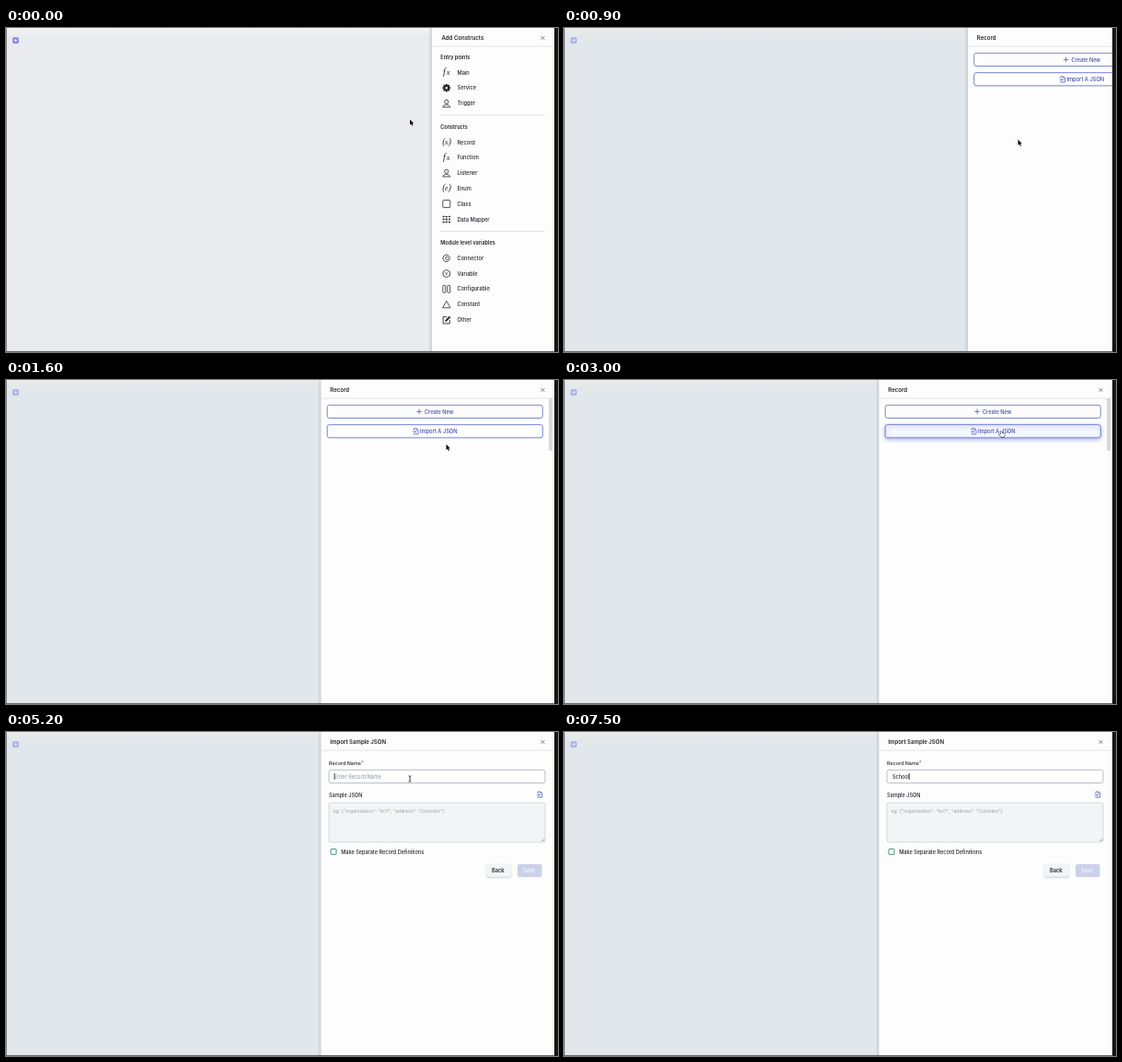
These frames come from a looping animation (600 px wide and 353 px high, 8 s). An HTML page with a canvas:

```html
<!DOCTYPE html>
<html lang="en">
<head>
<meta charset="utf-8">
<title>Add Constructs</title>
<style>
html, body { margin: 0; width: 100%; height: 100%; overflow: hidden; background: #e3e7eb; }
canvas { display: block; }
</style>
</head>
<body>
<canvas id="stage" width="600" height="353"></canvas>
<script>
const ctx = document.getElementById('stage').getContext('2d');
const W = 600, H = 353, LOOP = 8000, STEP = 100;
const EDGE = 596, WIDE = 342.5, NARROW = 463;
const SANS = 'Inter, "Open Sans", sans-serif';
const SERIF = '"Liberation Serif", "Noto Serif", serif';
const INK = '#24252c', BLUE = '#4a5ac4', PAPER = '#fdfdfd';

// Cursor waypoints: time, x, y
const PATH = [
  [0, 439, 99.5], [500, 493.5, 121.5], [950, 493.5, 121.5], [1500, 478.5, 70],
  [1600, 478.5, 70], [1800, 480, 93], [2200, 475.5, 55.5], [3600, 475.5, 55.5],
  [4200, 439, 51]
];
// Moment each letter of the word appears
const KEYS = [5500, 6400, 6700, 7000, 7200, 7500];
const WORD = 'School';

function text(str, x, y, size, color = INK, weight = 500) {
  ctx.font = `${weight} ${size}px ${SANS}`;
  ctx.fillStyle = color;
  ctx.fillText(str, x, y + 2.05);
}

function serif(str, x, y, size) {
  ctx.font = `italic 500 ${size}px ${SERIF}`;
  ctx.fillStyle = INK;
  ctx.fillText(str, x, y);
}

function line(points, color = INK, width = 0.8, close = false) {
  ctx.beginPath();
  points.forEach(([x, y], i) => i ? ctx.lineTo(x, y) : ctx.moveTo(x, y));
  if (close) ctx.closePath();
  ctx.strokeStyle = color;
  ctx.lineWidth = width;
  ctx.stroke();
}

function arc(x, y, r, from = 0, to = Math.PI * 2, color = INK, width = 0.8) {
  ctx.beginPath();
  ctx.arc(x, y, r, from, to);
  ctx.strokeStyle = color;
  ctx.lineWidth = width;
  ctx.stroke();
}

function box(x, y, w, h, r, fill, stroke, width = 1) {
  ctx.beginPath();
  ctx.roundRect(x, y, w, h, r);
  if (fill) { ctx.fillStyle = fill; ctx.fill(); }
  if (stroke) { ctx.strokeStyle = stroke; ctx.lineWidth = width; ctx.stroke(); }
}

function shadowed(color, blur, dy, draw) {
  ctx.save();
  ctx.shadowColor = color;
  ctx.shadowBlur = blur;
  ctx.shadowOffsetY = dy;
  draw();
  ctx.restore();
}

function at(x, y, draw) {
  ctx.save();
  ctx.translate(x, y);
  draw();
  ctx.restore();
}

const icons = {
  fx() { serif('f', -3.8, 2.6, 10); serif('x', 0, 2.6, 8.5); },
  gear() {
    ctx.fillStyle = INK;
    for (let i = 0; i < 8; i++) {
      ctx.save();
      ctx.rotate(i * Math.PI / 4);
      ctx.fillRect(-0.95, -4.3, 1.9, 2.5);
      ctx.restore();
    }
    arc(0, 0, 2.3, 0, Math.PI * 2, INK, 1.9);
  },
  person() {
    arc(0, -1.8, 2.1);
    ctx.beginPath();
    ctx.moveTo(-4, 4);
    ctx.bezierCurveTo(-3.8, 0.6, 3.8, 0.6, 4, 4);
    ctx.closePath();
    ctx.stroke();
  },
  record() { brackets('x'); },
  enumeration() { brackets('e'); },
  square() { box(-4, -4, 8, 8, 0.8, null, INK, 0.8); },
  mapper() {
    for (const y of [-3, 0, 3]) {
      box(-4.2, y - 0.8, 2, 1.6, 0, INK);
      line([[-1.5, y], [1.6, y]], INK, 0.8);
      box(2.4, y - 0.8, 1.8, 1.6, 0, INK);
    }
    line([[0, -3], [0, 3]], INK, 0.7);
  },
  connector() {
    arc(0, 0, 3.8, 0.75, Math.PI * 2 - 0.75);
    arc(0.7, 0, 1.7, 0.6, Math.PI * 2 - 0.6);
    line([[2.1, -1], [4.4, -1]]);
    line([[2.1, 1], [4.4, 1]]);
  },
  hexagon() {
    line([[0, -4.2], [3.7, -2.1], [3.7, 2.1], [0, 4.2], [-3.7, 2.1], [-3.7, -2.1]], INK, 0.8, true);
    line([[-1.6, -1.3], [0, 0], [1.6, -1.3]], INK, 0.7);
    line([[0, 0], [0, 2]], INK, 0.7);
  },
  columns() {
    box(-3.9, -4, 2.9, 8, 0.9, null, INK, 0.8);
    box(1, -4, 2.9, 8, 0.9, null, INK, 0.8);
  },
  triangle() { line([[0, -3.8], [4.2, 3.6], [-4.2, 3.6]], INK, 0.8, true); },
  edit() {
    line([[0.5, -3.3], [-3.7, -3.3], [-3.7, 4], [3.5, 4], [3.5, 0.2]], INK, 0.9);
    line([[-1.2, 1.6], [3.8, -3.5]], INK, 1.9);
  }
};

function brackets(letter) {
  serif('(', -4.6, 2.5, 9.5);
  serif(letter, -1.8, 2.1, 8);
  serif(')', 1.9, 2.5, 9.5);
}

const SECTIONS = [
  ['Entry points', 31.5, [['fx', 'Main', 48.5], ['gear', 'Service', 65.3], ['person', 'Trigger', 82.2]]],
  ['Constructs', 107.5, [['record', 'Record', 124.5], ['fx', 'Function', 141.3],
    ['person', 'Listener', 158], ['enumeration', 'Enum', 174.8], ['square', 'Class', 191.6],
    ['mapper', 'Data Mapper', 208.5]]],
  ['Module level variables', 234, [['connector', 'Connector', 250.8], ['hexagon', 'Variable', 267.6],
    ['columns', 'Configurable', 284.4], ['triangle', 'Constant', 301.2], ['edit', 'Other', 318]]]
];

function importIcon(x, y) {
  at(x, y, () => {
    line([[-2, -0.8], [-2, -3], [0.9, -3], [2.7, -1.2], [2.7, 3.2], [-2, 3.2], [-2, 2]], BLUE, 0.75);
    line([[0.9, -3], [0.9, -1.2], [2.7, -1.2]], BLUE, 0.6);
    line([[-3.2, 0.6], [0.5, 0.6]], BLUE, 0.7);
    line([[-0.6, -0.5], [0.5, 0.6], [-0.6, 1.7]], BLUE, 0.7);
  });
}

function backdrop(dimmed) {
  const base = dimmed ? '#e2e7eb' : '#eaebef';
  ctx.fillStyle = base;
  ctx.fillRect(0, 0, W, H);
  const fade = ctx.createLinearGradient(0, 0, 0, 9);
  fade.addColorStop(0, dimmed ? '#ebebed' : '#f3f3f5');
  fade.addColorStop(1, base);
  ctx.fillStyle = fade;
  ctx.fillRect(0, 0, W, 9);
  box(7.5, 10.5, 6, 6, 1.2, dimmed ? '#b3b9ea' : '#8f95e3', dimmed ? '#a4abe2' : '#777ed8', 0.8);
  const mark = dimmed ? '#e3e6fa' : '#eceefe';
  line([[9, 13.5], [12, 13.5]], mark, 0.8);
  line([[10.5, 12], [10.5, 15]], mark, 0.8);
}

function frame() {
  ctx.fillStyle = '#6b6c70';
  ctx.fillRect(0, 0, 0.8, H);
  ctx.fillRect(0, H - 1, EDGE, 1);
  ctx.fillStyle = '#161712';
  ctx.fillRect(EDGE, 0, W - EDGE, H);
}

function panel(left, title, titleX) {
  const shade = ctx.createLinearGradient(left - 4, 0, left, 0);
  shade.addColorStop(0, 'rgba(60,65,80,0)');
  shade.addColorStop(1, 'rgba(60,65,80,0.16)');
  ctx.fillStyle = shade;
  ctx.fillRect(left - 4, 0, 4, H);
  ctx.fillStyle = PAPER;
  ctx.fillRect(left, 0, W - left, H);
  ctx.fillStyle = '#e3e4e8';
  ctx.fillRect(left, 19.5, W - left, 1);
  text(title, titleX, 10.7, 6.05, INK, 600);
}

function closeMark(x) {
  line([[x - 1.9, 9], [x + 1.9, 12.8]], '#555661', 0.75);
  line([[x + 1.9, 9], [x - 1.9, 12.8]], '#555661', 0.75);
}

function constructList(hover) {
  panel(NARROW, 'Add Constructs', 473.5);
  closeMark(583.5);
  SECTIONS.forEach(([title, y, rows], i) => {
    if (i) {
      ctx.fillStyle = '#e1e2e6';
      ctx.fillRect(472, y - 13, 114, 1);
    }
    text(title, 472.3, y, 5.5, INK, 600);
    for (const [icon, label, rowY] of rows) {
      at(478.8, rowY, icons[icon]);
      text(label, 490.5, rowY, 5.7, hover && label === 'Record' ? BLUE : INK);
    }
  });
}

function recordMenu(shift, hover) {
  at(shift, 0, () => {
    panel(WIDE, 'Record', 352.3);
    closeMark(583.5);
    box(349.2, 27.3, 234.1, 14.2, 2.4, PAPER, '#7580c2', 0.95);
    line([[446.3, 34.4], [451.9, 34.4]], BLUE, 0.8);
    line([[449.1, 31.6], [449.1, 37.2]], BLUE, 0.8);
    text('Create New', 455, 34.5, 5.62, '#3f4da8');
    const button = () => box(349.2, 48.7, 234.1, 14.2, 2.4, hover ? '#f5f7ff' : PAPER, '#6b79d4', 0.95);
    if (hover) shadowed('rgba(85,103,213,0.45)', 4, 1.5, button);
    else button();
    importIcon(445.3, 55.8);
    text('Import A JSON', 449.9, 55.9, 5.73, '#3f4da8');
    ctx.fillStyle = '#d9d9db';
    ctx.fillRect(590, 20, 4, 57);
  });
}

function caretOn(t, typed) {
  if (t < 4200) return false;
  const last = typed ? KEYS[typed - 1] : 4200;
  return Math.floor((t - last) / 500) % 2 === 0;
}

function form(t) {
  panel(WIDE, 'Import Sample JSON', 352.3);
  closeMark(583.5);
  text('Record Name', 351, 34, 5.42);
  text('*', 385.8, 34, 5.6, '#d9434e');
  box(351, 41.3, 235, 14.3, 2.4, '#fff', t < 4200 ? '#d3d5dd' : '#b2b6c0', 0.9);

  const typed = KEYS.filter(k => k <= t).length;
  const word = WORD.slice(0, typed);
  if (typed) text(word, 356.9, 48.6, 5.5);
  else text('Enter Record Name', 356.9, 48.6, 5.57, '#8d91a3', 400);
  if (caretOn(t, typed)) {
    ctx.font = `500 5.5px ${SANS}`;
    ctx.fillStyle = INK;
    ctx.fillRect(356.6 + (typed ? ctx.measureText(word).width + 0.1 : 0), 45, 0.8, 7);
  }

  text('Sample JSON', 351, 69.3, 5.55);
  importIcon(580, 68);
  box(351, 77, 235, 43, 2, '#f3f4f6', '#d4d6dc', 0.9);
  text('eg: {"organization": "kri7", "address": "Colombo"}', 355.6, 86.3, 5.15, '#9a9da9', 400);
  line([[582.3, 119], [585.3, 116]], '#777a82', 0.6);
  line([[584, 119], [585.3, 117.7]], '#777a82', 0.6);

  box(353, 127.4, 6, 6, 0.6, '#fff', '#3d9178', 1);
  text('Make Separate Record Definitions', 364.2, 130.6, 5.56);
  shadowed('rgba(50,55,80,0.3)', 2, 0.8, () => box(522, 144, 27, 13.8, 2.2, '#f3f4f8'));
  text('Back', 528, 151.2, 5.7, INK, 600);
  box(556, 144, 26.5, 14, 2.2, '#cbd1ea');
  text('Save', 562, 151.2, 5.5, '#f6f7fd', 600);
}

function arrow() {
  const shape = [[0, 0], [0, 6.2], [1.4, 5], [2.4, 7.2], [3.5, 6.7], [2.5, 4.6], [4.3, 4.4]];
  line(shape, '#fff', 1.1, true);
  ctx.fillStyle = '#0b0b0d';
  ctx.fill();
}

function hand() {
  const shape = [[-0.9, 0.4], [-0.2, -0.4], [0.5, 0.4], [0.6, 2.2], [3.2, 2.9], [3.5, 4],
    [2.8, 6.6], [-0.5, 6.6], [-2.7, 3.9], [-2, 3.2], [-0.8, 4]];
  line(shape, '#15161c', 1, true);
  ctx.fillStyle = '#fff';
  ctx.fill();
}

function beam() {
  line([[0, -2.8], [0, 2.8]], '#1b1c20', 0.9);
  for (const s of [-1, 1]) line([[-1.4, 3.2 * s], [0, 2.7 * s], [1.4, 3.2 * s]], '#1b1c20', 0.75);
}

function pointer(t) {
  if (t >= KEYS[0]) return;
  let i = PATH.findIndex(p => p[0] > t);
  if (i < 0) i = PATH.length - 1;
  const [t0, x0, y0] = PATH[i - 1], [t1, x1, y1] = PATH[i];
  const raw = Math.min(1, (t - t0) / (t1 - t0));
  const p = raw * raw * (3 - 2 * raw);
  const shape = t >= 3900 ? beam : t >= 2100 && t < 3100 ? hand : arrow;
  at(x0 + (x1 - x0) * p, y0 + (y1 - y0) * p, shape);
}

// Decelerating curve, equal to cubic-bezier(0, 0, .2, 1)
function decelerate(x) {
  let lo = 0, hi = 1;
  for (let i = 0; i < 24; i++) {
    const s = (lo + hi) / 2;
    if (0.6 * (1 - s) * s * s + s ** 3 < x) lo = s; else hi = s;
  }
  return 3 * lo * lo - 2 * lo ** 3;
}

function draw(t) {
  ctx.clearRect(0, 0, W, H);
  backdrop(t >= 700);
  if (t < 700) constructList(t >= 400);
  else if (t < 3100) {
    const p = Math.max(0, Math.min(1, (t - 760) / 500));
    recordMenu((EDGE - WIDE) * (1 - decelerate(p)), t >= 2100);
    if (t < 800) {
      ctx.fillStyle = '#e9eae6';
      ctx.fillRect(594, 0, 2, 343);
    }
  } else form(t);
  frame();
  pointer(t);
}

const start = performance.now();
function tick(now) {
  const t = Math.max(0, now - start) % LOOP;
  draw(Math.floor(t / STEP) * STEP);
  requestAnimationFrame(tick);
}
draw(0);
requestAnimationFrame(tick);
</script>
</body>
</html>
```
